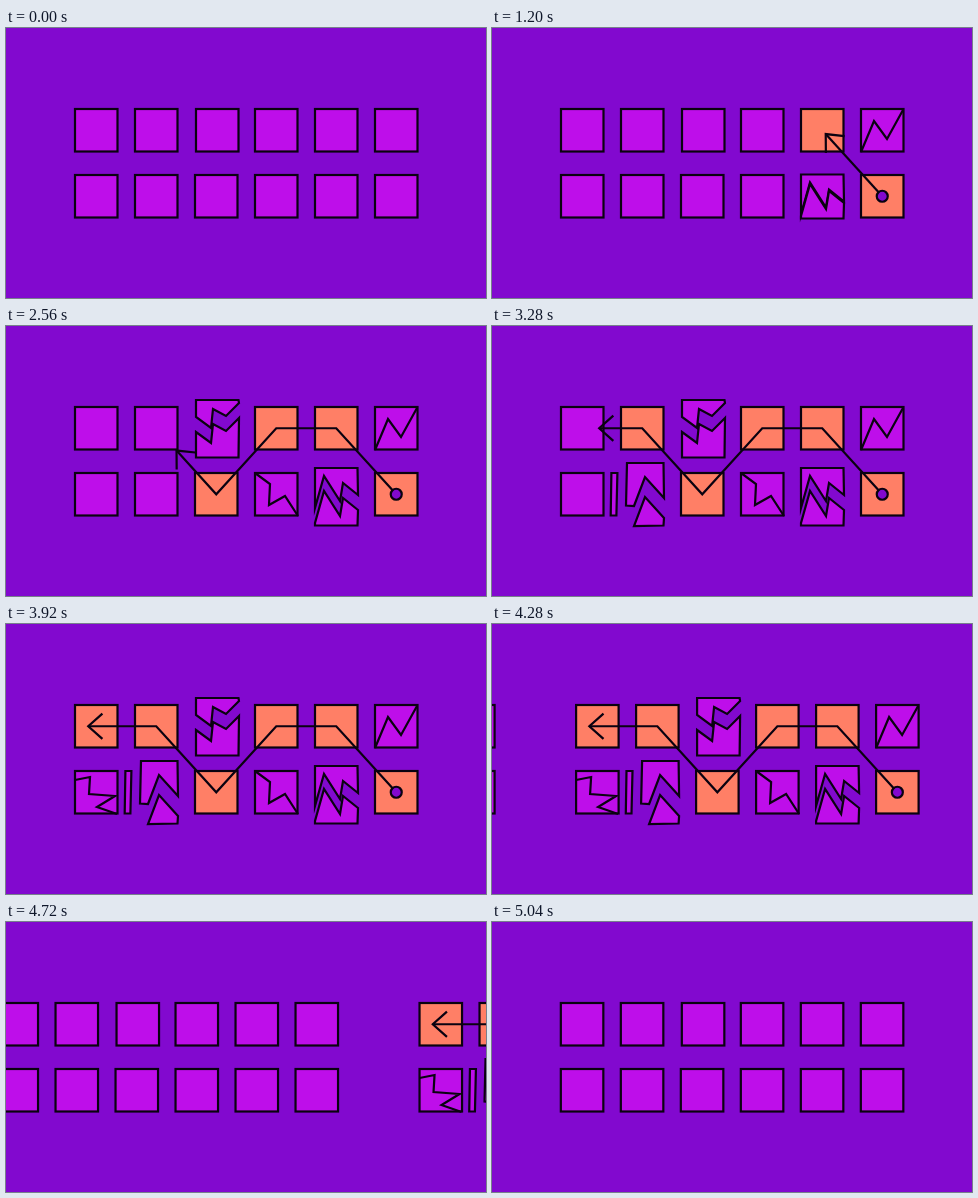
Recreate the animation shown at these times as an HTML page. Size 480 px wide and 270 px high, loop 5080 ms.

```html
<!DOCTYPE html>
<html lang="en">
<head>
<meta charset="utf-8">
<title>Tile path</title>
<style>
  html, body { margin: 0; width: 100%; height: 100%; overflow: hidden; background: #8209cf; }
  svg { display: block; width: 100vw; height: 100vh; }
</style>
</head>
<body>
<svg id="stage" viewBox="0 0 480 270" fill="none" stroke="#0a0210" stroke-width="2.2" stroke-miterlimit="10"></svg>
<script>
const LOOP = 5080, SCROLL = 424;
const COLS = 6, SIZE = 42.5, LEFT = 69, PITCH = 60, TOP = 81, GAP = 66;
const START = 730, LEG = 500, LAST_LEG = 870;
const PINK = '#be0eea', ORANGE = '#ff7f66', PURPLE = '#8209cf';
const stage = document.getElementById('stage');

const clamp = v => Math.max(0, Math.min(1, v));
const span = (t, start, length) => clamp((t - start) / length);
const easeOut = u => 1 - (1 - u) ** 3;
const easeInOut = u => u < 0.5 ? 4 * u ** 3 : 1 - 4 * (1 - u) ** 3;
const lerp = (a, b, u) => a + (b - a) * u;

// One safe row per column, left to right; the other tile of the column breaks.
const safeRow = [0, 0, 1, 0, 0, 1];

// Zigzag inside the tile; split tiles drift apart by up / down, chip is a loose side strip.
const cracks = [
  { zigzag: 'M42 43 22 36 40 25 14 23 15 6 0 9' },
  { zigzag: 'M43 35 24 14 13 43', up: 10, down: 10, chip: 6 },
  { zigzag: 'M43 3 30 16 17 9 15 28 0 17', up: 7, down: 8, nudge: 1 },
  { zigzag: 'M43 43 30 23 14 32 15 11 0 0' },
  { zigzag: 'M43 27 28 15 25 33 9 8 0 40', up: 5, down: 10 },
  { zigzag: 'M0 43 13 12 26 30 42 1' }
];

const center = col => LEFT + SIZE / 2 + col * PITCH;
const middle = row => TOP + SIZE / 2 + row * GAP;
const arrival = col => col ? START + LEG * (COLS - 1 - col) : START + LEG * (COLS - 2) + LAST_LEG;

const line = list => `<polyline points="${list.join(' ')}"/>`;
const shard = (d, dx, dy) => `<path d="${d}z" fill="${PINK}" transform="translate(${dx} ${dy})"/>`;

function splitTile({ zigzag, up, down, chip = 0 }, t, start) {
  const u = easeOut(span(t, start, 320));
  const foot = Math.max(0, chip - 1);
  const corner = `L${foot} ${SIZE}`;
  const upper = `${zigzag}${chip ? corner : ''}L${chip} 0 ${SIZE} 0`;
  const lower = `${zigzag}${chip ? '' : corner}L${SIZE} ${SIZE}`;
  const slide = -9.6 * easeOut(span(t, start + 130, 380));
  const strip = chip ? shard(`M0 0H${chip}L${foot} ${SIZE}H-0.7`, slide, 0) : '';
  return shard(upper, 0, -up * u) + shard(lower, 0, down * u) + strip;
}

function drawTile(col, row, t, headX) {
  const safe = row === safeRow[col];
  const crack = cracks[col], due = arrival(col);
  const x = LEFT + col * PITCH + (safe ? 0 : crack.nudge || 0);
  let art;
  if (!safe && crack.up && t >= due - 40) {
    art = splitTile(crack, t, due - 40);
  } else {
    const fill = safe && headX < center(col) + 6 ? ORANGE : PINK;
    art = `<rect width="${SIZE}" height="${SIZE}" fill="${fill}"/>`;
    const drawn = safe ? 0 : span(t, due - 120, 80);
    if (drawn) art += `<path d="${crack.zigzag}" pathLength="1" stroke-dasharray="${drawn} 2"/>`;
  }
  return `<g transform="translate(${x} ${TOP + row * GAP})">${art}</g>`;
}

// Corners passed so far, ending with the moving tip.
function trailAt(t) {
  const trail = [[center(COLS - 1), middle(safeRow[COLS - 1])]];
  for (let col = COLS - 2; col >= 0 && t > arrival(col + 1); col--) {
    const [x, y] = trail[trail.length - 1];
    const u = span(t, arrival(col + 1), arrival(col) - arrival(col + 1));
    const endX = col ? center(col) : center(0) - 8;
    trail.push([lerp(x, endX, u), lerp(y, middle(safeRow[col]), u)]);
  }
  return trail;
}

function drawArrow(trail) {
  if (trail.length < 2) return '';
  const [x0, y0] = trail[trail.length - 2], [x, y] = trail[trail.length - 1];
  const back = Math.atan2(y0 - y, x0 - x);
  const reach = trail.length > 2 ? 19 : Math.min(19, Math.hypot(x0 - x, y0 - y));
  const barb = turn => [x + reach * Math.cos(back + turn), y + reach * Math.sin(back + turn)];
  return line(trail) + line([barb(0.73), [x, y], barb(-0.73)]);
}

function board(t, dx) {
  const trail = trailAt(t);
  const dotX = lerp(487, center(COLS - 1), span(t, 0, 580));
  const headX = Math.min(dotX, trail[trail.length - 1][0] + (dotX - center(COLS - 1)));
  let art = '';
  for (let row = 0; row < 2; row++)
    for (let col = 0; col < COLS; col++) art += drawTile(col, row, t, headX);
  art += drawArrow(trail);
  if (t > 0) art += `<circle cx="${dotX}" cy="${middle(1)}" r="5.5" fill="${PURPLE}"/>`;
  return `<g transform="translate(${dx} 0)">${art}</g>`;
}

function render(t) {
  const shift = SCROLL * easeInOut(span(t, 4070, 1018));
  stage.innerHTML = board(t, shift) + (shift ? board(0, shift - SCROLL) : '');
}

const begin = performance.now();
function tick() {
  render(Math.max(0, performance.now() - begin) % LOOP);
  requestAnimationFrame(tick);
}
render(0);
requestAnimationFrame(tick);
</script>
</body>
</html>
```
